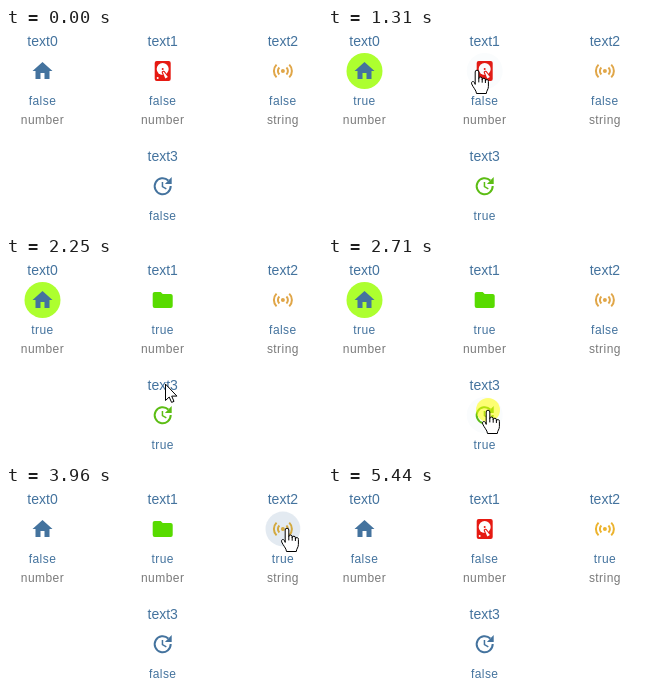
These frames come from a looping animation (316x201 px, 5.9 s). An HTML page:

```html
<!DOCTYPE html>
<html lang="en">
<head>
<meta charset="utf-8">
<title>Toggle icons</title>
<style>
  html, body { margin: 0; width: 100%; height: 100%; overflow: hidden; background: #fff; }
  svg { display: block; }
  text { font-family: "Liberation Sans", Arial, sans-serif; text-anchor: middle; fill: #44739e; }
  .title { font-size: 14px; }
  .value, .type { font-size: 12px; letter-spacing: .45px; }
  .type { fill: #7a7a7a; }
  .pointer { fill: #fff; stroke: #000; stroke-linejoin: round; stroke-linecap: round; }
</style>
</head>
<body>
<svg id="stage" width="316" height="201" viewBox="0 0 316 201">
  <defs>
    <path id="home" d="M10 20V14H14V20H19V12H22L12 3L2 12H5V20Z"/>
    <path id="folder" d="M10 4H4C2.9 4 2 4.9 2 6V18A2 2 0 0 0 4 20H20A2 2 0 0 0 22 18V8C22 6.9 21.1 6 20 6H12Z"/>
    <g id="disk">
      <rect x="4" y="2" width="16" height="20" rx="2"/>
      <circle cx="12" cy="10" r="6" fill="#fff"/>
      <circle cx="12" cy="10" r="1"/>
      <path d="M12.1 13.3L14.6 19.6L17.2 18.1L12.95 12.8Z" stroke="currentColor" stroke-width="2.2" stroke-linejoin="round"/>
      <path d="M12.1 13.3L14.6 19.6L17.2 18.1L12.95 12.8Z" fill="#fff"/>
      <circle cx="7" cy="19" r="1" fill="#fff"/>
    </g>
    <g id="signal">
      <path fill="none" stroke="currentColor" stroke-width="2" d="M5.64 5.64a9 9 0 0 0 0 12.72M18.36 5.64a9 9 0 0 1 0 12.72M8.46 8.46a5 5 0 0 0 0 7.08M15.54 8.46a5 5 0 0 1 0 7.08"/>
      <circle cx="12" cy="12" r="2"/>
    </g>
    <g id="update">
      <path fill="none" stroke="currentColor" stroke-width="2" d="M17.6 6.5A8 8 0 1 0 20 12.1"/>
      <path d="M21 3V10.12H14.22ZM12.5 8V12.25L16 14.33L15.28 15.54L11 13V8Z"/>
    </g>
  </defs>
</svg>
<script>
const LOOP = 5900;
const BLUE = '#44739e';
const RADIUS = 18;

// Looks for false and true: [icon, colour, badge]
const cells = [
  { col: 0, row: 0, type: 'number', looks: [['home', BLUE], ['home', BLUE, 'greenyellow']] },
  { col: 1, row: 0, type: 'number', looks: [['disk', '#e61a12'], ['folder', '#58db00']] },
  { col: 2, row: 0, type: 'string', looks: [['signal', '#e0a648'], ['signal', '#ecb32e']] },
  { col: 1, row: 1, looks: [['update', BLUE], ['update', '#5cbd14']] }
];

// Each press toggles its cells some time later; the ripple sits on the first one.
const presses = [
  { hit: [0, 3], at: 600, reply: 680, fade: 760 },
  { hit: [1], at: 1380, reply: 1610, fade: 2010 },
  { hit: [3, 0], at: 2710, reply: 2800, fade: 2800 },
  { hit: [2], at: 3660, reply: 3890, fade: 4190 },
  { hit: [1], at: 5130, reply: 5210, fade: 5290 }
];

// Pointer trips: start, end, x, y
const ENTER = [135, 137];
const trips = [
  [70, 600, 41, 41],
  [760, 1080, 141, 41],
  [1270, 1380, 154, 43],
  [1930, 2560, 160, 153],
  [2960, 3580, 281, 42],
  [4420, 5050, 158, 44],
  [5210, 5440, 230, 162]
];

const stage = document.getElementById('stage');
const clamp = v => Math.min(1, Math.max(0, v));
const easeOut = p => 1 - (1 - p) ** 2;

function set(el, attrs) {
  for (const key in attrs) el.setAttribute(key, attrs[key]);
}

function add(tag, attrs, parent = stage) {
  const el = document.createElementNS('http://www.w3.org/2000/svg', tag);
  set(el, attrs);
  return parent.appendChild(el);
}

function label(cls, x, y, str = '') {
  const el = add('text', { class: cls, x, y });
  el.textContent = str;
  return el;
}

cells.forEach((c, i) => {
  c.x = 36.5 + 120.2 * c.col;
  c.y = 43 + 115 * c.row;
  label('title', c.x, c.y - 25, 'text' + i);
  c.badge = add('circle', { cx: c.x, cy: c.y, r: RADIUS });
  c.icon = add('use', { x: c.x - 12, y: c.y - 12 });
  c.value = label('value', c.x, c.y + 34);
  if (c.type) label('type', c.x, c.y + 53, c.type);
});

const shade = add('circle', { fill: BLUE });
const flash = add('circle', { r: 12, fill: '#ff0', 'fill-opacity': .55 });
const hand = add('g', { class: 'pointer' });
add('path', { d: 'M-1.8 14V2A1.8 1.8 0 0 1 1.8 2V8.5A1.7 1.7 0 0 1 5.2 9V9.6A1.6 1.6 0 0 1 8.4 10V10.8A1.5 1.5 0 0 1 11.4 11.5V16.5C11.4 19.5 9.5 20.5 9.3 23.5H-.5C-.5 20.5 -4.2 17 -5.3 14C-6.1 11.4 -3.6 10.6 -2.6 12.4Z' }, hand);
add('path', { d: 'M1.8 8.5V12M5.2 9.5V12.3M8.4 10.5V12.6', fill: 'none' }, hand);
const arrow = add('path', { class: 'pointer', d: 'M.5 .5V16.5L4.2 13L6.6 18.4L9 17.4L6.7 12.1H11.5Z' });

function pointerAt(t) {
  let [x, y] = ENTER;
  for (const [start, end, tx, ty] of trips) {
    const p = easeOut(clamp((t - start) / (end - start)));
    x += (tx - x) * p;
    y += (ty - y) * p;
  }
  return [Math.round(x), Math.round(y)];
}

const show = (el, on) => set(el, { visibility: on ? 'visible' : 'hidden' });

function drawCells(t) {
  const done = presses.filter(p => t >= p.reply + 70);
  cells.forEach((c, i) => {
    const on = done.filter(p => p.hit.includes(i)).length % 2 === 1;
    const [icon, color, badge] = c.looks[+on];
    set(c.icon, { href: '#' + icon, fill: color, color });
    set(c.badge, { fill: badge || 'none' });
    c.value.textContent = on;
  });
}

function drawShade(t, hovered) {
  const press = presses.find(p => t >= p.reply && t < p.fade + 150);
  const cell = press ? cells[press.hit[0]] : hovered;
  show(shade, cell);
  if (!cell) return;
  const grow = press ? clamp((t - press.reply) / 80) : 1;
  const opacity = press ? .15 * (1 - clamp((t - press.fade) / 150)) : .025;
  set(shade, { cx: cell.x, cy: cell.y, r: RADIUS * (.7 + .3 * grow), opacity });
}

function draw(t) {
  const [x, y] = pointerAt(t);
  const visible = t >= trips[0][0] && t < 5440;
  const hovered = visible && cells.find(c => Math.hypot(c.x - x, c.y - y) < RADIUS);
  const transform = `translate(${x} ${y})`;

  drawCells(t);
  drawShade(t, hovered);
  show(hand, visible && hovered);
  show(arrow, visible && !hovered);
  set(hand, { transform });
  set(arrow, { transform });
  set(flash, { cx: x, cy: y });
  show(flash, presses.some(p => t >= p.at && t < p.at + 80));
}

const begin = performance.now();
function tick() {
  draw((performance.now() - begin) % LOOP);
  requestAnimationFrame(tick);
}
tick();
</script>
</body>
</html>
```
